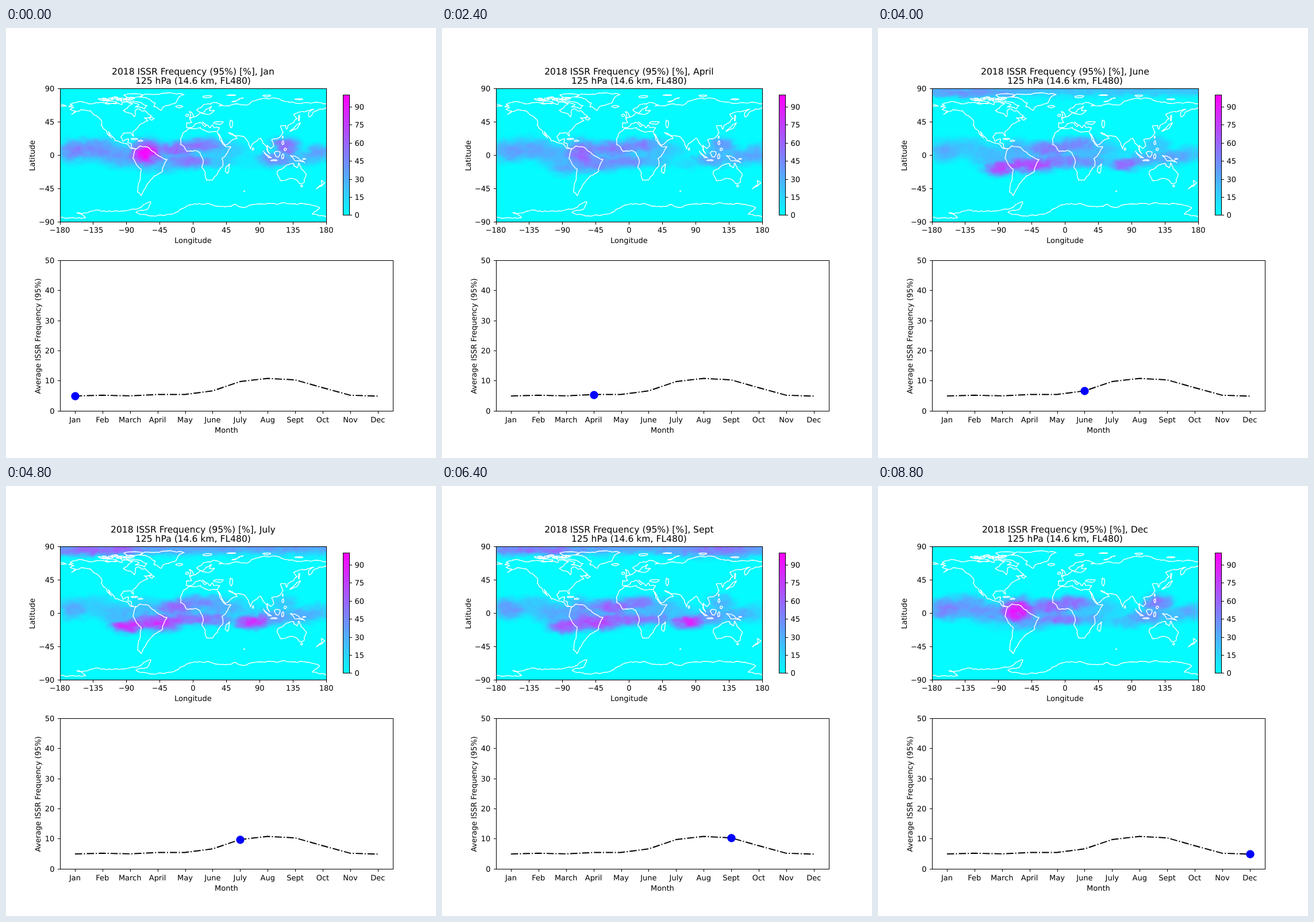
An HTML page with a canvas for the animation above (9600 ms loop, 748 by 748 pixels).

```html
<!DOCTYPE html>
<html lang="en">
<head>
<meta charset="utf-8">
<title>ISSR frequency by month</title>
<style>
html, body { margin: 0; width: 100%; height: 100%; overflow: hidden; background: #fff; }
canvas { position: absolute; left: 94px; top: 104.7px; width: 463.3px; height: 231.9px; background: #04fbff; }
svg { position: absolute; left: 0; top: 0; width: 748px; height: 748px; }
text { font: 12.99px "DejaVu Sans", sans-serif; fill: #000; text-rendering: geometricPrecision; }
.title { font-size: 15.58px; }
.mid { text-anchor: middle; }
.end { text-anchor: end; }
.axis { fill: none; stroke: #000; stroke-width: 1.04; }
.coast { fill: none; stroke: #fff; stroke-width: 1.1; stroke-linejoin: round; }
.avg { fill: none; stroke: #000; stroke-width: 1.95; stroke-dasharray: 12.5 3.1 1.95 3.1; }
</style>
</head>
<body>
<canvas id="heat" width="232" height="116"></canvas>
<svg viewBox="0 0 748 748">
<defs>
  <clipPath id="box"><rect x="-180" y="-90" width="360" height="180"/></clipPath>
  <linearGradient id="cool" x1="0" y1="1" x2="0" y2="0">
    <stop offset="0" stop-color="#04fbff"/><stop offset="1" stop-color="#f0f"/>
  </linearGradient>
</defs>
<g clip-path="url(#box)" transform="translate(325.38 220.66) scale(1.2882 -1.2882)">
  <path class="coast" id="coast"/>
</g>
<rect x="586.5" y="116.5" width="11" height="209" fill="url(#cool)"/>
<g class="axis">
  <rect x="94.5" y="105.5" width="463" height="232"/>
  <rect x="94.5" y="404.5" width="579" height="262"/>
  <rect x="586.5" y="116.5" width="11" height="209"/>
  <path id="ticks"/>
</g>
<path class="avg" id="avg"/>
<circle id="dot" r="7.2" fill="#00f"/>
<g id="labels">
  <text class="title mid" id="head" x="325.4" y="80.5"></text>
  <text class="title mid" x="325.4" y="97">125 hPa (14.6 km, FL480)</text>
  <text class="mid" x="325.4" y="374">Longitude</text>
  <text class="mid" x="383.4" y="703.5">Month</text>
  <text class="mid" transform="translate(49.5 222) rotate(-90)">Latitude</text>
  <text class="mid" transform="translate(59.5 536) rotate(-90)">Average ISSR Frequency (95%)</text>
</g>
</svg>
<script>
const $ = id => document.getElementById(id);
const STEP = 800, W = 232, H = 116;
const names = ["Jan", "Feb", "March", "April", "May", "June", "July", "Aug", "Sept", "Oct", "Nov", "Dec"];
const means = [4.9, 5.15, 4.95, 5.4, 5.42, 6.6, 9.7, 10.75, 10.25, 7.65, 5.15, 4.85];
const chartX = i => 119.9 + i * 47.9;
const chartY = v => 665.8 - v * 5.236;
const snap = v => Math.floor(v + .5) + .5;

// axes
let ticks = "";
function label(x, y, s, cls) {
  const t = document.createElementNS("http://www.w3.org/2000/svg", "text");
  t.setAttribute("x", x);
  t.setAttribute("y", y);
  t.setAttribute("class", cls);
  t.textContent = String(s).replace("-", "\u2212");
  $("labels").append(t);
}
function tickX(x, y, s) {
  ticks += `M${snap(x)} ${snap(y)}v4.5`;
  label(x, y + 19.8, s, "mid");
}
function tickY(x, y, s) {
  ticks += `M${snap(x)} ${snap(y)}h-4.5`;
  label(x - 9.1, y + 5, s, "end");
}
for (let d = -180; d <= 180; d += 45) tickX(325.38 + d * 1.2882, 336.6, d);
for (let d = -90; d <= 90; d += 45) tickY(93.5, 220.66 - d * 1.2882, d);
for (let v = 0; v <= 50; v += 10) tickY(93.5, chartY(v), v);
for (let v = 0; v <= 90; v += 15) {
  const y = 325.3 - v * 2.093;
  ticks += `M597.5 ${snap(y)}h4.5`;
  label(606.4, y + 5, v, "");
}
names.forEach((n, i) => tickX(chartX(i), 665.8, n));
$("ticks").setAttribute("d", ticks);
$("avg").setAttribute("d", "M" + means.map((v, i) => chartX(i) + " " + chartY(v)).join("L"));

// repeatable random numbers, 0..1
function hash(x, y) {
  let n = Math.imul(x, 374761393) + Math.imul(y, 668265263);
  n = Math.imul(n ^ (n >>> 13), 1274126177);
  return ((n ^ (n >>> 16)) >>> 0) / 4294967296;
}
let count = 0;
const rand = () => hash(++count, 7);

// coastlines: a few corners in degrees, roughened by midpoint displacement
let shore = "";
function wander(x0, y0, x1, y1) {
  const dx = x1 - x0, dy = y1 - y0;
  if (Math.hypot(dx, dy) < 2.5) return `L${x1.toFixed(2)} ${y1.toFixed(2)}`;
  const k = (rand() - .5) * .22;
  const x = (x0 + x1) / 2 - dy * k, y = (y0 + y1) / 2 + dx * k;
  return wander(x0, y0, x, y) + wander(x, y, x1, y1);
}
function coast(corners) {
  const p = corners.split(" ").map(Number);
  shore += `M${p[0]} ${p[1]}`;
  for (let i = 2; i < p.length; i += 2) shore += wander(p[i - 2], p[i - 1], p[i], p[i + 1]);
}
function land(corners) {
  coast(corners + " " + corners.split(" ", 2).join(" "));
}
function island(x, y, rx, ry) {
  for (let i = 0; i < 9; i++) {
    const a = i * Math.PI / 4.5, r = .75 + rand() * .5;
    shore += `${i ? "L" : "M"}${x + rx * r * Math.cos(a)} ${y + ry * r * Math.sin(a)}`;
  }
  shore += "z";
}

// Americas
coast("-168 65 -161 64 -166 61.5 -158 58.6 -164 54.6 -151 61 -139 59.5 -128 51 -124 47 -124 40 -117 32.5 -110 23 -114.5 31.5 -106 22 -105 19 -95 16 -87 13 -83.5 8.5 -78 8");
coast("-168 65 -162 66.5 -166 68.4 -156 71.3 -136 69 -115 68.5 -96 68 -94 72 -82 69 -86 66.5 -94 60 -82 55 -79 51.3 -78 60 -74 62.3 -69 59 -65 60 -56 52");
coast("-56 52 -66 50 -61 46 -66 44 -70 42 -75.7 36 -81.4 31 -80.5 25.2 -84 30 -94 29.5 -97.5 24 -94.5 18.2 -90.4 21 -87 21.5 -88 16 -83.3 15 -83 10 -77 8.5");
land("-77 8 -72 12 -62 10.7 -50 1 -35.2 -6 -39 -13 -41 -22 -48.5 -27 -58 -35 -62 -40 -66 -47 -68.5 -52.5 -70 -55 -75 -50 -73.5 -38 -70.3 -19 -76 -14 -81 -5 -80 1");
land("-73 78.3 -60 82 -33 83.6 -12 81.5 -20 77 -23 70.5 -40 65 -43 60 -53 65 -51 70 -59 75.5");
land("-89 72 -72 71 -62 66.5 -66 62 -78 64.7 -73 68");
// Africa
coast("33 31 20 31 10.8 35 10 37 -6 35.8 -17 22 -17 14 -8 4.5 5 5.5 9.3 3 13.7 -11 12 -17 18.3 -34 26 -34 33 -26 40.4 -14 39 -5 51 11 43 12 33 30");
land("49.4 -12 47 -25 43.5 -22 45 -16");
// Eurasia
coast("33 30 43 13 59.5 22 56 26 48 30 57 26 67 25 72.7 20 77.5 8 80.2 15 91 22.5 94.3 16 98.5 12 103.5 1.3 100 13 105 8.6 109 12 106 20 115 22.5 121.8 30 119 36 118 39 125 39.7 126.5 34.5 128 39");
coast("128 39 140.5 49 136 54.7 155 59.5 163 61.5 156 57 156.7 51 163 58 179 62.5 180 65");
coast("180 69 160 69.7 131 71 107 77 80 72.5 72 67 60 68.8 44 66 35 66 40 67 28 71 14 67.5 5 60.5 12.8 56 17.5 61.7 25 65.5 22 60 29 60 20 54.5 10 57 4 52 -4.6 48.5 -1.5 43.5");
coast("-1.5 43.5 -9 43 -9 37 -2 36.8 3 42 9 44 16 38 18 40 12.5 44.5 20 40 23 36.5 26 40.5 28 36.7 36 36.5 33 31");
coast("-180 69 -171 66 -180 65");
land("-5 50 1 51.5 -2 57.6 -5 58.6 -3 54");
land("52 71.5 68 77 57 72");
land("130.5 31.5 140 41 145 43.5 140.8 36");
// Oceania and Antarctica
land("142.5 -10.7 146 -19 153 -27 150 -37.4 143.5 -38.8 137.8 -33 131 -31.6 118 -35 113.5 -26 114.2 -22 126 -14 136 -12 136 -15 140.7 -17.5");
land("131 -1 138 -2 150.8 -10.5 138 -8.3");
land("95 5.6 106 -4 102 -4");
land("173 -34.5 178 -38 174 -41.5");
land("172.8 -40.6 174 -42 166.5 -46");
coast("-180 -84 -145 -85 -157 -78 -130 -74.3 -75 -73 -57 -63.5 -62 -74 -77 -78 -60 -82 -30 -80 -12 -71.5 30 -69 57 -66.8 70 -71 82 -67 135 -66.2 171 -71.5 161 -80 180 -84");
// Arctic archipelago
island(-110, 71, 8, 1.8);
island(-80, 80, 13, 2.5);
for (let i = 0; i < 12; i++) island(-122 + i * 3.6, 72 + rand() * 6, 2 + rand() * 4, .5 + rand());
// Atlantic, inland seas, far north
island(-79.5, 21.5, 5, .8);
island(-71, 19, 3, .9);
island(-56, 49, 3, 1.8);
island(-19, 65, 5, 1.4);
island(-8, 53.5, 2, 1.6);
island(35, 43.3, 6.5, 1.8);
island(51.5, 42, 2, 5);
island(19, 78.5, 7, 1.4);
island(52, 80.6, 6, .5);
island(100, 79.6, 5, 1.2);
island(143, 75, 5, .7);
// Asia and Pacific
island(81, 7.7, .9, 1.5);
island(110, -7.3, 4.5, .7);
island(114, 1, 4, 4);
island(121, -2, 1.6, 3);
island(121.5, 16, 1.3, 2.6);
island(124.5, 7.5, 1.7, 1.5);
island(121, 23.7, .6, 1.4);
island(143, 50, .9, 3.8);
island(146.5, -42, 1.5, 1.2);
island(69.3, -49, .7, .4);
island(150, -5.5, 2, .5);
$("coast").setAttribute("d", shore);

// smooth noise
function noise(x, y) {
  const i = Math.floor(x), j = Math.floor(y);
  const ease = t => t * t * (3 - 2 * t);
  const mix = (a, b, t) => a + (b - a) * t;
  const u = ease(x - i), v = ease(y - j);
  return mix(mix(hash(i, j), hash(i + 1, j), u), mix(hash(i, j + 1), hash(i + 1, j + 1), u), v);
}
const rough = (x, y) => noise(x, y) * .6 + noise(x * 2.1, y * 2.1) * .4;

// humid regions: x, y, half width, half height, yearly mean, swing, peak month
const spots = [
  [243, 217, 28, 20, 58, 32, 0],
  [295, 211, 34, 12, 57, 6, 9],
  [340, 203, 34, 11, 50, 5, 11],
  [212, 244, 26, 11, 40, 42, 6.3],
  [265, 237, 42, 13, 53, 28, 6.5],
  [318, 231, 38, 11, 52, 6, 8.5],
  [362, 232, 35, 10, 36, 16, 7.5],
  [430, 236, 27, 11, 42, 44, 7.3],
  [487, 205, 22, 14, 38, 18, 0],
  [468, 228, 28, 12, 39, 6, 10],
  [515, 225, 36, 12, 30, 4, 5],
  [545, 218, 22, 14, 27, 10, 1],
  [116, 214, 26, 17, 39, 7, 11],
  [155, 210, 38, 17, 31, 12, .5],
  [198, 222, 36, 17, 33, 6, 11],
  [370, 212, 44, 16, 27, 3, 6],
  [405, 220, 38, 16, 13, 9, 8],
  [165, 112, 85, 9, 5, 58, 6.8],
  [480, 111, 75, 13, -5, 53, 8.3],
  [325, 104, 600, 14, 6, 36, 6.9]
];
function field(month) {
  const level = spots.map(s => Math.max(0, s[4] + s[5] * Math.cos((month - s[6]) * Math.PI / 6)));
  const seed = month * 37;
  const img = ctx.createImageData(W, H);
  for (let j = 0; j < H; j++) for (let i = 0; i < W; i++) {
    const px = 94.5 + i * 2, py = 106 + j * 2;
    const x = px + (rough(px / 15 + seed, py / 9) - .5) * 16;
    const y = py + (rough(px / 15, py / 9 + seed) - .5) * 10;
    let sum = 0;
    spots.forEach(([cx, cy, rx, ry], k) => {
      const d = ((x - cx) / rx) ** 2 + ((y - cy) / ry) ** 2;
      if (d < 4) sum += (level[k] * Math.exp(-.7 * d ** 1.5)) ** 3;
    });
    const v = Math.cbrt(sum) * (.78 + .4 * rough(px / 9 + 50, py / 6 + seed));
    const c = 255 * Math.min(1, Math.max(.016, v / 100));
    img.data.set([c, 255 - c, 255, 255], (j * W + i) * 4);
  }
  return img;
}
const ctx = $("heat").getContext("2d");
const maps = names.map((n, m) => field(m));

let shown = -1;
function show(m) {
  shown = m;
  ctx.putImageData(maps[m], 0, 0);
  $("head").textContent = `2018 ISSR Frequency (95%) [%], ${names[m]}`;
  $("dot").setAttribute("cx", snap(chartX(m)));
  $("dot").setAttribute("cy", snap(chartY(means[m])));
}
function tick() {
  const m = Math.floor(performance.now() / STEP) % names.length;
  if (m !== shown) show(m);
  requestAnimationFrame(tick);
}
tick();
</script>
</body>
</html>
```
